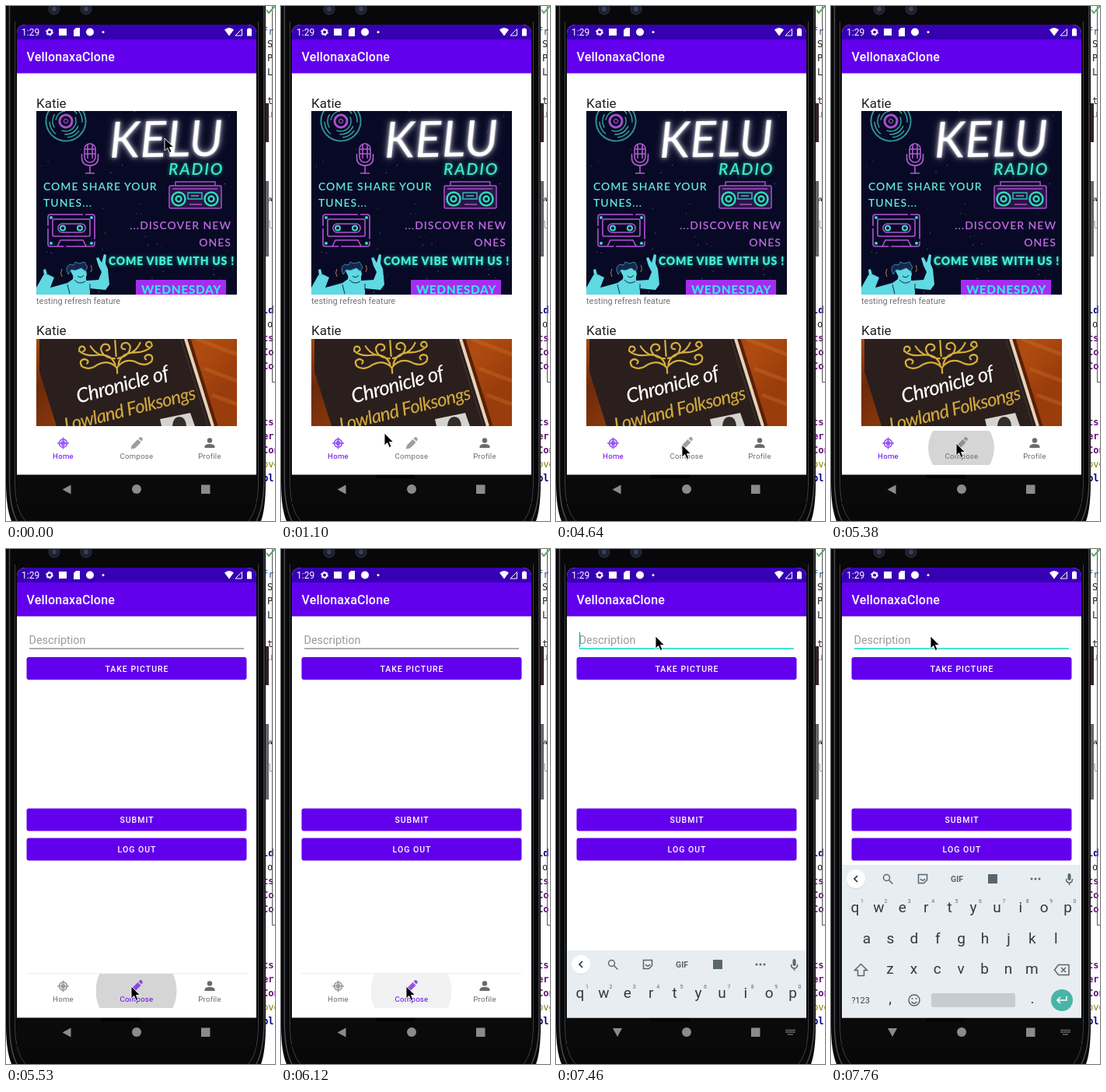
Recreate the animation shown at these times as an HTML page. Size 346 px wide and 662 px high, loop 8 s.

```html
<!DOCTYPE html>
<html lang="en">
<head>
<meta charset="utf-8">
<title>Phone demo</title>
<style>
html, body { margin: 0; width: 100%; height: 100%; overflow: hidden; background: #fff; }
svg { display: block; width: 346px; height: 662px; font-family: Roboto, sans-serif; }
.mid { text-anchor: middle; }
.btn { font-size: 10.5px; font-weight: 500; letter-spacing: 1px; fill: #fff; text-anchor: middle; }
.tab { fill: #6b6b6b; color: #6b6b6b; font-size: 9.6px; letter-spacing: .25px; text-anchor: middle; }
.tab.on { fill: #6200ee; color: #6200ee; }
.icon { opacity: .65; }
.line { fill: none; stroke: currentColor; }
.poster { font-family: Lato, sans-serif; font-size: 14px; font-weight: 600; letter-spacing: 1px; }
.script { font-family: Lato, sans-serif; font-style: italic; }
.key { font-size: 19px; fill: #2f3b42; text-anchor: middle; }
.num { font-size: 7px; fill: #5f6b72; }
#editor text { font-family: "DejaVu Sans Mono", monospace; font-size: 12px; }
</style>
</head>
<body>
<svg viewBox="0 0 346 662">
<defs>
  <clipPath id="screenClip"><path d="M14 602.500V36Q14 24 26 24H310Q322 24 322 36V602.500Z"/></clipPath>
  <clipPath id="posterClip"><rect x="39" y="135" width="258" height="236"/></clipPath>
  <clipPath id="bookClip"><rect x="39" y="428" width="258" height="112"/></clipPath>
  <clipPath id="tabClip"><rect x="116" y="546" width="104" height="44"/></clipPath>
  <linearGradient id="wood" x2="1" y2=".4">
    <stop stop-color="#a8480f"/><stop offset=".2" stop-color="#6d2a0a"/><stop offset=".75" stop-color="#b04c10"/><stop offset="1" stop-color="#9a3d0c"/>
  </linearGradient>
</defs>

<!-- editor window behind the phone -->
<g id="editor"></g>
<path d="M342.500 0V483.500H346" fill="none" stroke="#555"/>
<path d="M335 5l3 4 8-9" fill="none" stroke="#59a869" stroke-width="2"/>

<!-- phone body -->
<path d="M333 125h5v50h-5z" fill="#33242a"/><path d="M333 225h5v97h-5z" fill="#66666a"/>
<path d="M0 0H334V612Q334 645 328 662H7Q0 645 0 612Z" fill="#08080a"/>
<path d="M4.500 0V612Q5 645 14 662M332 0V612Q331 645 322 662" fill="none" stroke="#4a4a4e" stroke-width="1.500"/>
<path d="M11.500 20V615Q12 648 25 662M324.500 20V615Q324 648 312 662" fill="none" stroke="#3e3e42"/>
<g fill="#1d1f2a" stroke="#34343c"><circle cx="62" cy="4" r="7"/><circle cx="103" cy="4" r="7"/></g>
<g fill="#34405e"><circle cx="62" cy="4" r="3"/><circle cx="103" cy="4" r="3"/></g>
<path d="M14 602H322V640H14Z" fill="#0a0a0b"/>
<rect id="shade" x="122" y="602" width="50" height="5"/>

<g clip-path="url(#screenClip)">
  <rect x="14" y="24" width="308" height="579" fill="#fff"/>

  <g id="feed">
    <g font-size="17" fill="#1f1f1f"><text x="39" y="130.500">Katie</text><text x="39" y="423">Katie</text></g>
    <text x="39" y="382.500" font-size="11" fill="#757575">testing refresh feature</text>

    <g class="poster" clip-path="url(#posterClip)">
      <rect x="39" y="135" width="258" height="236" fill="#080a25"/>
      <g id="stars" fill="#7179a8"></g>
      <!-- record -->
      <g fill="none" stroke="#8a45b8" stroke-width="1.400" transform="rotate(35 77 148)">
        <circle cx="77" cy="148" r="25.500" stroke="#2f8f94" stroke-width="2"/>
        <g stroke="#35a9a5" stroke-dasharray="18 16"><circle cx="77" cy="148" r="21"/><circle cx="77" cy="148" r="17"/><circle cx="77" cy="148" r="13"/></g>
        <circle cx="77" cy="148" r="8" stroke="#a850d0" stroke-width="3"/><circle cx="77" cy="148" r="2.500"/>
      </g>
      <!-- microphone -->
      <g fill="none" stroke="#b05bd0" stroke-width="1.600">
        <rect x="101" y="177" width="14" height="24" rx="7"/>
        <path d="M97.500 190v5q0 10 10.500 10t10.500-10v-5M108 205v10M102 215h12M101 184h14M101 190h14M105 178v18M111 178v18"/>
      </g>
      <text class="script" x="133" y="195" font-size="64" font-weight="400" letter-spacing="0" fill="#fff" transform="rotate(-1 133 195)" style="filter:drop-shadow(0 0 2px #aaaab8) drop-shadow(0 0 4px #77778c)">KELU</text>
      <text class="script" x="209" y="217" font-size="21" letter-spacing="1.800" fill="#42e6c6" style="filter:drop-shadow(0 0 2px #14a08c)">RADIO</text>
      <g fill="#5fe6d6"><text x="48" y="237">COME SHARE YOUR</text><text x="48" y="258">TUNES...</text></g>
      <g fill="#bd68e0" text-anchor="end"><text x="290" y="287">...DISCOVER NEW</text><text x="290" y="309">ONES</text></g>
      <text x="132" y="333" font-weight="900" letter-spacing=".800" fill="#46efd0" style="filter:drop-shadow(0 0 2px #159c8c)">COME VIBE WITH US !</text>
      <!-- boombox -->
      <g fill="none" stroke="#a850c8" stroke-width="1.500">
        <rect x="210" y="231" width="67" height="29" rx="2" fill="#2a1648"/>
        <path d="M218 231v-5h51v5M214 235h58M236 255h16"/><path d="M234 240h18v8h-18zM238 244h10" stroke="#35b9b0"/>
        <g stroke="#35d6bd" stroke-width="2.500" fill="#0b1a34">
          <circle cx="222" cy="248" r="8.500"/><circle cx="264" cy="248" r="8.500"/>
          <circle cx="222" cy="248" r="3.500"/><circle cx="264" cy="248" r="3.500"/>
        </g>
      </g>
      <!-- cassette -->
      <g fill="none" stroke="#b452d8" stroke-width="1.600">
        <rect x="54" y="268" width="60" height="41" rx="3" stroke-dasharray="42 3"/><rect x="60" y="274" width="48" height="22" rx="2"/>
        <rect x="67" y="280" width="35" height="11" rx="5"/><path d="M66 309l4-8h29l4 8"/>
        <g stroke="#40d8c8" stroke-width="2"><circle cx="73" cy="285.500" r="3"/><circle cx="95" cy="285.500" r="3"/></g>
      </g>
      <g fill="#40d8c8"><circle cx="58" cy="272" r="2"/><circle cx="110" cy="272" r="2"/><circle cx="58" cy="305" r="2"/><circle cx="110" cy="305" r="2"/></g>
      <!-- dancer -->
      <path d="M39 371V362L48 346L54 345L62 349L60 354L57 362L79 356L86 351L87 343L103 346L103 353L119 352L123 342L119 334L116 324L119 323L123 330L126 319L129 320L128 331L131 338L133 358L128 365L108 363V371Z" fill="#5fd9e2"/>
      <path d="M49 347l-1-8 3-1 2 7M81 334l20-3 3 14q-2 9-9 9q-9-2-14-20Z" fill="#5fd9e2"/>
      <path d="M80 345q-5-9 2-13l5 1 2-4 5 2 7-2 4 7-3 5-5-4-8 3-5-1Z" fill="#17264b" stroke="#4ab4cc" stroke-width=".700"/>
      <path d="M92 347q4 4 8-1M79 358l3 12M108 357v8M88 352q6 7 14 2" fill="none" stroke="#17264b"/>
      <path d="M72 338q-3 5 0 10M109 333q3 5 0 9" fill="none" stroke="#b8784a"/>
      <rect x="167" y="352" width="116" height="20" fill="#a52df0"/>
      <text x="225.500" y="370" class="mid" font-size="15.500" font-weight="800" letter-spacing=".600" fill="#35e7ee">WEDNESDAY</text>
    </g>

    <g clip-path="url(#bookClip)">
      <rect x="39" y="428" width="258" height="112" fill="url(#wood)"/>
      <path d="M245 428l52 20M255 466l42 16M265 500l32 12" stroke="#d0722c" stroke-width="5" opacity=".35"/>
      <path d="M43 428H230L266 540H65L43 470Z" fill="#2a1f1d"/>
      <path d="M235 428l35 112" stroke="#5a2008" stroke-width="5"/>
      <path d="M231 428l35 112" stroke="#e6d3b8" stroke-width="4"/>
      <path d="M225 428l35 112" stroke="#463530"/>
      <g transform="rotate(-4 142 455)" fill="none" stroke="#d6ae3c" stroke-width="2.200" stroke-linecap="round">
        <g id="scroll"><path d="M142 465q-10-12-24-6q-12 8-21 1q-4-8 4-9q7 2 3 6M140 461q-4-15-23-14q-14 1-22-7q0-7 6-5q4 4-1 6M140 453q-16-2-17-14q3-8 10-4q4 6-3 7M122 447q-8-4-12-12"/></g>
        <use href="#scroll" transform="matrix(-1 0 0 1 284 0)"/>
        <path d="M142 465v7M142 450v-20"/>
      </g>
      <text class="script" x="93" y="511" font-size="26" font-weight="500" letter-spacing="-.700" fill="#fff" transform="rotate(-15 93 511)">Chronicle of</text>
      <text class="script" x="77" y="547" font-size="24" font-weight="500" letter-spacing="-.800" fill="#d0a63c" transform="rotate(-14 77 547)">Lowland Folksongs</text>
      <path d="M198 531l39-8 6 17h-43Z" fill="#d5d3d0"/>
      <path d="M214 540q1-12 9-12t9 12Z" fill="#332d2b"/>
    </g>
  </g>

  <g id="compose">
    <text x="29.500" y="122" font-size="14.400" fill="#9b9b9b">Description</text>
    <path id="underline" d="M30 128H306" stroke-width="1.500"/>
    <path id="caret" d="M30.500 107v19" stroke="#03c9b5" stroke-width="1.500"/>
    <g fill="#6200ee">
      <rect x="26.500" y="139" width="283" height="29" rx="3"/>
      <rect x="26.500" y="333.500" width="283" height="29" rx="3"/>
      <rect x="26.500" y="371.500" width="283" height="29" rx="3"/>
    </g>
    <g class="btn"><text x="168.500" y="157.500">TAKE PICTURE</text><text x="168.500" y="352">SUBMIT</text><text x="168.500" y="390">LOG OUT</text></g>
    <path d="M26 545.500H310" stroke="#eee"/>
  </g>

  <circle id="ripple" cx="167.500" cy="568" clip-path="url(#tabClip)"/>
  <g id="home" class="tab">
    <g class="icon"><circle cx="73.500" cy="562" r="3"/><circle cx="73.500" cy="562" r="5" class="line" stroke-width="1.800"/>
      <path class="line" stroke-width="1.500" d="M73.500 554.500v15M66 562h15"/></g>
    <text x="73.500" y="582">Home</text>
  </g>
  <g id="write" class="tab">
    <path class="icon" d="M160.500 569.500l1.500-5 7.500-7.500 4 4-7.500 7.500ZM170.500 556l1.500-1.500q1.500-1 3 .5t.5 3l-1.500 1.500Z"/>
    <text x="168" y="582">Compose</text>
  </g>
  <g class="tab"><circle cx="262" cy="558.500" r="3.200"/><path d="M255.500 568v-1.500q0-3.500 6.500-3.500t6.500 3.500v1.500Z"/><text x="262" y="582">Profile</text></g>

  <g id="keyboard">
    <rect x="14" y="406" width="308" height="197" fill="#e8edf1"/>
    <circle cx="32" cy="425" r="12" fill="#d3d8dc"/><circle cx="32" cy="424" r="12" fill="#fff"/>
    <g fill="none" stroke="#59666e" stroke-width="1.500">
      <path d="M34 420l-4 4 4 4" stroke="#222"/>
      <circle cx="71.500" cy="422.500" r="4"/><path d="M74.500 425.500l5 5"/>
      <path d="M112.500 418.500h11v7l-4 4h-7zM115 424q3 4 6 0"/>
      <path d="M302.500 424q0 5 4 5t4-5M306.500 429v3"/>
      <path d="M38.500 533.500l8 8h-4v7h-8v-7h-4Z"/>
      <path d="M287.500 541l5-6.500h13.500v13h-13.500ZM296 538l6 6M302 538l-6 6"/>
      <circle cx="107" cy="580" r="7"/><path d="M103.500 582q3.500 4 7 0"/>
    </g>
    <g fill="#59666e">
      <rect x="202" y="418" width="12" height="12"/>
      <rect x="304.500" y="417" width="4" height="9" rx="2"/>
      <circle cx="258" cy="424" r="1.500"/><circle cx="263" cy="424" r="1.500"/><circle cx="268" cy="424" r="1.500"/>
      <circle cx="104.500" cy="578" r="1"/><circle cx="109.500" cy="578" r="1"/>
      <text x="162" y="428" class="mid" font-size="10.500" font-weight="700">GIF</text>
    </g>
    <rect x="129" y="571" width="108" height="18" rx="3" fill="#c7ccd0"/>
    <text x="38" y="584" class="mid" font-size="11" fill="#37434a">?123</text>
    <circle cx="297" cy="580" r="14" fill="#48b5a7"/>
    <path d="M303 575v5h-12M295 576l-4 4 4 4" fill="none" stroke="#fff" stroke-width="1.600"/>
    <g id="keys"></g>
  </g>

  <rect x="14" y="24" width="308" height="19" fill="#3700b3"/>
  <rect x="14" y="43" width="308" height="43.500" fill="#6200ee"/>
  <text x="26.500" y="71" font-size="16" font-weight="500" letter-spacing=".150" fill="#fff">VellonaxaClone</text>
  <g fill="#fff">
    <text x="20" y="38" font-size="12">1:29</text>
    <circle cx="56" cy="33.500" r="3" fill="none" stroke="#fff" stroke-width="2"/>
    <circle cx="56" cy="33.500" r="4.500" fill="none" stroke="#fff" stroke-dasharray="2.200 2.510"/>
    <rect x="68" y="29" width="10" height="9"/>
    <path d="M87 31l3-3h5v11h-8Z"/>
    <circle cx="108" cy="33.500" r="5"/><circle cx="125" cy="33.500" r="1.500"/>
    <path d="M281 30.500q6-5 12 0l-6 8ZM310 29.500h1.500v-1h3v1h1.500v9h-6Z"/>
    <path d="M303.500 29.500v8.500h-8.500Z" fill="none" stroke="#fff"/>
  </g>
</g>

<g fill="#8b8b8b">
  <path id="back" d="M72.500 621.500l11-6v12Z"/>
  <circle cx="168" cy="621" r="6"/><rect x="251" y="615.500" width="11.500" height="11.500"/>
  <path id="ime" d="M295.500 618.500h12M295.500 621h12M298 624h7" stroke="#8b8b8b" stroke-width="1.500" stroke-dasharray="1.500 .600"/>
</g>

<path id="cursor" d="M0 0V16L3.700 12.600L6.300 18.500L9 17.300L6.500 11.600H11.500Z" stroke="#fff" stroke-width=".9"/>
</svg>

<script>
const $ = id => document.getElementById(id);
const label = (x, y, cls, s) => `<text x="${x}" y="${y}" class="${cls}">${s}</text>`;
const show = (id, on) => $(id).setAttribute('visibility', on ? 'visible' : 'hidden');
const at = (steps, t) => steps.findLast(s => s[0] <= t);

// keyboard letters: row, first key x, baseline
$('keys').innerHTML = [['qwertyuiop', 31, 467], ['asdfghjkl', 46, 507], ['zxcvbnm', 76, 546]]
  .map(([row, x, y], r) => [...row].map((c, i) => {
    const kx = x + i * 30.4;
    return label(kx, y, 'key', c) + (r ? '' : label(kx + 7, 455, 'num', (i + 1) % 10));
  }).join('')).join('') + label(76, 584, 'key', ',') + label(259, 584, 'key', '.');

// code fragments beside the phone: text, baseline, colour, weight
$('editor').innerHTML = [
  ['fr', 37, '#1a4f9c'], ['S', 53, '#222'], ['P', 71, '#222'], ['L', 89, '#222'], ['t', 126, '#222'],
  ['u', 143, '#999'], ['w', 251, '#222'], ['l', 286, '#999'], ['ld', 395, '#000080', 700], ['o', 413, '#222'],
  ['ts', 431, '#660e7a', 700], ['Co', 449, '#660e7a', 700], ['Co', 467, '#660e7a', 700], ['ts', 539, '#660e7a', 700],
  ['er', 557, '#660e7a', 700], ['Con', 575, '#660e7a', 700], ['ove', 593, '#808000'], ['bl', 611, '#000080', 700]
].map(([s, y, fill, weight = 400]) =>
  `<text x="${s.length > 1 ? 330 : 336}" y="${y}" fill="${fill}" font-weight="${weight}">${s}</text>`).join('');

let seed = 7;
const rand = () => (seed = seed * 16807 % 2147483647) / 2147483647;
$('stars').innerHTML = Array.from({ length: 70 }, () =>
  `<circle cx="${39 + rand() * 258}" cy="${135 + rand() * 236}" r="${.25 + rand() * .4}"/>`).join('');

// time, x, y
const cursorSteps = [
  [0, 204, 170], [500, 215, 185], [650, 255, 270], [800, 240, 400], [950, 170, 510], [1100, 133, 549],
  [1250, 148, 545], [1390, 172, 533], [1540, 185, 527],
  [2140, 183, 532], [2290, 177, 543], [2430, 170, 556], [2580, 164, 564], [2720, 162, 567],
  [4640, 162, 564], [4790, 161, 562],
  [6560, 160, 540], [6710, 153, 440], [6860, 143, 300], [7010, 133, 180], [7160, 129, 125], [7310, 128, 112]
];
// time, radius, opacity
const rippleSteps = [
  [0, 0, 0], [5380, 42.5, .165], [5530, 52, .165], [5670, 52, .14], [5820, 52, .11],
  [5970, 52, .08], [6120, 52, .05], [6270, 52, .02], [6420, 52, 0]
];
// time, distance below the resting place
const keyboardSteps = [[0, 200], [7460, 110], [7610, 14], [7760, 0]];

function draw(t) {
  const [, x, y] = at(cursorSteps, t);
  const [, r, alpha] = at(rippleSteps, t);
  const composing = t >= 5530, focused = t >= 7310, typing = t >= 7460;
  $('cursor').setAttribute('transform', `translate(${x} ${y})`);
  $('ripple').setAttribute('r', r);
  $('ripple').setAttribute('opacity', alpha);
  $('keyboard').setAttribute('transform', `translate(0 ${at(keyboardSteps, t)[1]})`);
  $('back').setAttribute('transform', typing ? 'rotate(-90 78.5 621)' : '');
  $('underline').setAttribute('stroke', focused ? '#03dac5' : '#929292');
  $('home').classList.toggle('on', !composing);
  $('write').classList.toggle('on', composing);
  show('feed', !composing);
  show('compose', composing);
  show('caret', focused && t < 7760);
  show('ime', typing);
  show('shade', t >= 1100);
}

function frame() {
  draw(performance.now() % 8000);
  requestAnimationFrame(frame);
}
frame();
</script>
</body>
</html>
```
